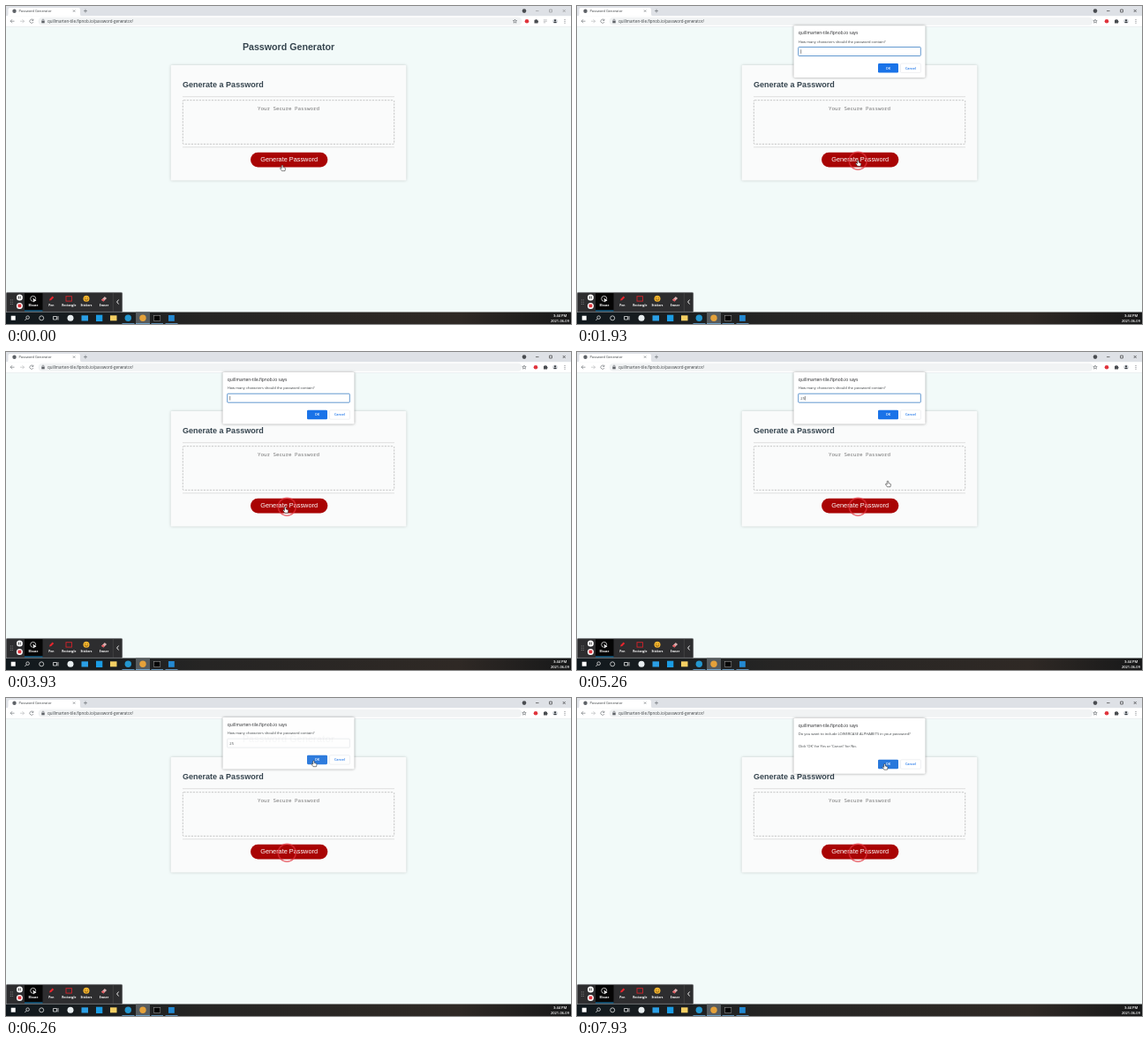
Recreate the animation shown at these times as an HTML page. Size 640 px wide and 360 px high, loop 8000 ms.

```html
<!DOCTYPE html>
<html lang="en">
<head>
<meta charset="utf-8">
<title>Password Generator</title>
<style>
html, body { margin: 0; width: 100%; height: 100%; overflow: hidden; background: #f2faf9; }
svg { display: block; font-family: "Open Sans", sans-serif; }
.page { font-family: "Liberation Sans", Arial, sans-serif; }
.mono { font: 5.85px "Noto Sans Mono", monospace; fill: #757575; }
.mid { text-anchor: middle; }
.line { fill: none; stroke: #5f6368; stroke-width: .6; }
.title { font-size: 4.9px; fill: #202124; }
.msg { font-size: 4.08px; fill: #3c4043; }
.btn { font-size: 3.8px; font-weight: 600; text-anchor: middle; }
.tool { font-size: 3.3px; font-weight: 700; fill: #fff; text-anchor: middle; }
.card { filter: drop-shadow(0 .7px 1.5px #0003); }
.dialog { filter: drop-shadow(0 .5px 1.5px #0006); }
</style>
</head>
<body>
<svg width="640" height="360" viewBox="0 0 640 360">
  <defs>
    <linearGradient id="bar">
      <stop offset="0" stop-color="#10181d"/>
      <stop offset=".35" stop-color="#262524"/>
      <stop offset=".8" stop-color="#2f2925"/>
      <stop offset="1" stop-color="#171819"/>
    </linearGradient>
    <g id="buttons">
      <rect id="ok" x="341" y="65.8" width="23" height="10.4" rx="1.3" fill="#1a73e8"/>
      <text class="btn" x="352.5" y="72.3" fill="#fff">OK</text>
      <rect x="366.5" y="65.8" width="23" height="10.4" rx="1.3" fill="#fff" stroke="#dadce0" stroke-width=".4"/>
      <text class="btn" x="378" y="72.3" fill="#1a73e8">Cancel</text>
    </g>
  </defs>

  <rect width="640" height="360" fill="#f2faf9"/>

  <g class="page">
    <text class="mid" x="320" y="50.3" font-size="10.67" font-weight="700" fill="#36454f">Password Generator</text>
    <rect class="card" x="186.7" y="67" width="266.6" height="130.6" rx="1" fill="#fafbfb"/>
    <text x="200" y="92.3" font-size="9.03" font-weight="700" fill="#36454f">Generate a Password</text>
    <path d="M200 102.7h240M200 159.8h240" stroke="#ccc" stroke-width=".6"/>
    <rect x="200.3" y="106.7" width="239.4" height="49.6" rx="1" fill="none" stroke="#b0b0b0" stroke-width=".7" stroke-dasharray="2.2 1.3"/>
    <text class="mono mid" x="320" y="118">Your Secure Password</text>
    <rect x="277" y="165.8" width="87.4" height="16.6" rx="8.3" fill="#a90404"/>
    <text class="mid" x="320.6" y="176.4" font-size="7.33" fill="#fff">Generate Password</text>
  </g>
  <circle id="ring" cx="318.3" cy="175.2" fill="none" stroke="#e2343e" stroke-width="1.5" opacity=".7"/>

  <!-- browser bar -->
  <rect width="640" height="11.5" fill="#dee1e6"/>
  <path d="M0 11.5q2.5 0 2.5-2.5V4q0-2 2-2H82q2 0 2 2v5q0 2.5 2.5 2.5z" fill="#fff"/>
  <rect y="11.3" width="640" height="12.2" fill="#fff"/>
  <rect x="36.5" y="12.7" width="548" height="9" rx="4.5" fill="#f1f3f4"/>
  <path d="M0 23.5h640" stroke="#dadce0" stroke-width=".4"/>
  <circle cx="9.5" cy="5.7" r="2.2" fill="#5f6368"/>
  <text x="14.5" y="7.2" font-size="3.9" fill="#3c4043">Password Generator</text>
  <path class="line" d="M76 4.5l2.2 2.2m0-2.2L76 6.7M88 5.6h4M90 3.6v4M9.5 17.2H5m2-2l-2 2 2 2M30.7 16a2.1 2.1 0 1 0 .2 2m0-3.3v1.7h-1.7M41 17v-1a1 1 0 0 1 2 0v1"/>
  <path class="line" d="M16 17.2h4.5m-2-2l2 2-2 2" opacity=".5"/>
  <rect x="40.3" y="16.8" width="3.4" height="2.5" fill="#5f6368"/>
  <text x="47" y="18.8" font-size="4.48" fill="#3c4043">quillmarten-tile.fipnob.io/password-generator/</text>
  <circle cx="587" cy="5.6" r="2.3" fill="#4a4d51"/>
  <path id="windowButtons" fill="none" stroke="#222" stroke-width=".6" d="M600 5.6h3.5M615.6 4h2.8v3h-2.8zM630.7 4l3 3m0-3l-3 3"/>
  <path id="star" class="line" d="M0-2.2l.6 1.5 1.6.1-1.2 1 .4 1.6L0 1.1-1.4 2l.4-1.6-1.2-1 1.6-.1z"/>
  <circle id="extension" cy="17.3" r="2.3" fill="#e0343c"/>
  <path id="puzzle" d="M-2-1.3h1.2a.8.8 0 0 1 1.6 0H2V0a.7.7 0 0 1 0 1.4v1h-4z" fill="#4a4d51"/>
  <path id="list" class="line" d="M608.8 15.8h4M608.8 17.3h4M608.8 18.8h2.4" opacity=".6"/>
  <circle cx="622" cy="17.2" r="2.7" fill="#cfd3d8"/>
  <circle cx="622" cy="16.3" r="1.1" fill="#33373b"/>
  <path d="M620 19q2-2.6 4 0z" fill="#33373b"/>
  <path d="M633 15v5" stroke="#5f6368" stroke-width=".9" stroke-dasharray=".9 1"/>

  <!-- dialogs -->
  <g id="prompt" class="dialog">
    <rect x="245.5" y="23" width="149" height="58.6" rx="1.3" fill="#fff"/>
    <text class="title" x="250.7" y="33.2">quillmarten-tile.fipnob.io says</text>
    <text class="msg" x="250.7" y="42.4">How many characters should the password contain?</text>
    <rect id="field" x="250.7" y="47.2" width="138.6" height="10" rx=".8" fill="#fff"/>
    <text id="typed" class="msg" x="253.3" y="53.7"></text>
    <path id="caret" d="M0 50v4.6" stroke="#222" stroke-width=".5"/>
    <use href="#buttons"/>
  </g>
  <g id="confirm" class="dialog">
    <rect x="245.5" y="23" width="149" height="62.7" rx="1.3" fill="#fff"/>
    <text class="title" x="250.7" y="33.2">quillmarten-tile.fipnob.io says</text>
    <text class="msg" x="250.7" y="42.4">Do you want to include LOWERCASE ALPHABETS in your password?</text>
    <text class="msg" x="250.7" y="55.6">Click 'OK' for Yes or 'Cancel' for No.</text>
    <use href="#buttons" y="4"/>
  </g>

  <!-- taskbar -->
  <rect y="346.5" width="640" height="13.5" fill="url(#bar)"/>
  <rect x="147" y="346.5" width="16" height="13.5" fill="#565b5e"/>
  <path d="M131.5 359.6h14M147 359.6h16M164.5 359.6h13.5M180.5 359.6h14" stroke="#76b9ed" stroke-width=".8"/>
  <rect x="5.7" y="350.7" width="5" height="5" fill="#fff"/>
  <g fill="none" stroke="#fff" stroke-width=".7">
    <circle cx="24.6" cy="352.6" r="1.8"/>
    <path d="M23.3 354l-2 2M53.5 351.5h4v3.5h-4zM59 351v4.5"/>
    <circle cx="40.2" cy="353.3" r="2.5"/>
  </g>
  <circle cx="73" cy="353.3" r="3.5" fill="#e8eef0"/>
  <rect x="85.5" y="350.3" width="7.5" height="6.2" fill="#2b9fe6"/>
  <rect x="102" y="349.7" width="7.3" height="7.3" fill="#1b9ce4"/>
  <rect x="118" y="350.3" width="7.5" height="6" fill="#f5cf63"/>
  <circle cx="138.3" cy="353.3" r="3.7" fill="#2497cf"/>
  <circle cx="155" cy="353.3" r="3.7" fill="#e5a13a"/>
  <rect x="167.3" y="350.3" width="7.5" height="6" fill="#050505" stroke="#aaa" stroke-width=".5"/>
  <rect x="184" y="350" width="6.8" height="6.8" fill="#2489d2"/>
  <g font-size="4.05" font-weight="600" fill="#fff" text-anchor="end">
    <text x="635.3" y="351.9">3:44 PM</text>
    <text x="638" y="357.6">2021-06-09</text>
  </g>

  <!-- recorder -->
  <rect x=".4" y="324.4" width="131.2" height="21.8" rx="1" fill="#2d2d2f" stroke="#5a5a5c" stroke-width=".7"/>
  <rect x="21" y="325" width="20.5" height="20.5" fill="#050505"/>
  <path d="M21 345h20.5" stroke="#1e9be0" stroke-width=".9"/>
  <path d="M5.3 332.5v6M7.3 332.5v6" stroke="#aaa" stroke-width=".8" stroke-dasharray=".8 1.5"/>
  <circle cx="15.4" cy="330" r="3.5" fill="#fff"/>
  <path d="M14.5 328.5v3M16.3 328.5v3" stroke="#222" stroke-width=".8"/>
  <circle cx="15.4" cy="339.4" r="3.5" fill="#fff"/>
  <rect x="13.5" y="337.5" width="3.8" height="3.8" rx=".8" fill="#e0343c"/>
  <circle cx="30.7" cy="331.3" r="3" fill="none" stroke="#ddd" stroke-width=".8"/>
  <path d="M30.5 330.5l4 3.3-1.9.2-1.1 1.6z" fill="#fff"/>
  <path d="M49 333.5l.7-2 3-3 1.5 1.5-3 3z" fill="#e8262e"/>
  <rect x="68" y="328.7" width="6.4" height="5.4" fill="none" stroke="#d8232b" stroke-width=".9"/>
  <circle cx="91" cy="331.3" r="3.5" fill="#f5b52e"/>
  <path d="M89 332q2 2.5 4 0M89.7 330.2v.8M92.3 330.2v.8" fill="none" stroke="#5b3a08" stroke-width=".7"/>
  <path d="M108 332.7l3.8-3.8 2.3 2-3.8 3.6z" fill="#d9b0b0"/>
  <path d="M108 332.7l1.5-1.5 2.3 2-1.5 1.3z" fill="#e2555c"/>
  <g class="tool">
    <text x="31" y="340.4">Mouse</text><text x="51.3" y="340.4">Pen</text>
    <text x="71.3" y="340.4">Rectangle</text><text x="91" y="340.4">Stickers</text>
    <text x="111" y="340.4">Eraser</text>
  </g>
  <path d="M121.3 325v21" stroke="#555" stroke-width=".5"/>
  <path d="M127.6 332.5l-2 2.5 2 2.5" fill="none" stroke="#fff" stroke-width=".9"/>

  <path id="hand" d="M-.8.4q.8-.9 1.6 0v2.1l1.9.6q.9.2.8 1.1l-.5 2.5H-.5l-2-2.7q-.1-1 .9-.7l.8.7z" fill="#fff" stroke="#222" stroke-width=".55"/>
</svg>
<script>
const LOOP = 8000, CLICK = 1530, PROMPT = 1800, CLOSE = 6200, CONFIRM = 7130, FADE = 330;
const $ = id => document.getElementById(id);
const clamp = v => Math.max(0, Math.min(1, v));
const set = (id, attrs) => {
  for (const key in attrs) $(id).setAttribute(key, attrs[key]);
};

// time, x, y of the fingertip
const path = [
  [0, 313, 180], [860, 318, 176], [1130, 318.3, 174.6], [3000, 318.3, 174.6],
  [3130, 316.3, 175.5], [5030, 316.3, 175.5], [5260, 352, 146],
  [5860, 348.5, 71], [7800, 348.5, 71], [7930, 348.5, 74.5], [LOOP, 348.5, 74.5]
];

function pointer(t) {
  const i = path.findIndex(p => p[0] > t);
  const [t0, x0, y0] = path[i - 1], [t1, x1, y1] = path[i];
  const k = (t - t0) / (t1 - t0), e = k * k * (3 - 2 * k);
  return `translate(${x0 + (x1 - x0) * e} ${y0 + (y1 - y0) * e})`;
}

// Dialogs drop in from above and rise again as they fade.
function dialog(id, t, start, end) {
  const enter = clamp((t - start + 20) / FADE), leave = clamp((t - end) / FADE);
  const lift = 8 * ((1 - enter) ** 4 + leave ** 1.2);
  set(id, {
    visibility: t >= start && leave < 1 ? "visible" : "hidden",
    opacity: Math.min(1, enter * 3) * (1 - leave ** 2),
    transform: `translate(0 ${-lift})`
  });
}

function draw(t) {
  const opened = t >= PROMPT, focused = t < CLOSE - 70;
  set("hand", { transform: pointer(t) });
  set("ring", {
    r: 10 * clamp((t - CLICK + 40) / 100),
    visibility: t < CLICK ? "hidden" : "visible"
  });
  set("windowButtons", { opacity: t < CLICK ? .45 : 1 });
  set("star", { transform: `translate(${opened ? 587 : 576.5} 17.2)` });
  set("extension", { cx: opened ? 600 : 590 });
  set("puzzle", { transform: `translate(${opened ? 611 : 600.5} 17)` });
  set("list", { visibility: opened ? "hidden" : "visible" });

  dialog("prompt", t, PROMPT, CLOSE);
  dialog("confirm", t, CONFIRM, LOOP);

  const text = "25".slice(0, (t >= 4600) + (t >= 4800));
  const blinkStart = t >= 4800 ? 4800 : t >= 4600 ? 4600 : PROMPT;
  const blinkOn = Math.floor((t - blinkStart) / 532) % 2 === 0;
  $("typed").textContent = text;
  set("field", { stroke: focused ? "#3b7fc4" : "#d5d8dc", "stroke-width": focused ? .8 : .5 });
  set("caret", { transform: `translate(${253.7 + text.length * 2.33} 0)`, opacity: +(focused && blinkOn) });
  set("ok", { fill: t >= 5860 ? "#2878dc" : "#1a73e8" });
}

const begin = performance.now();
(function tick() {
  draw((performance.now() - begin) % LOOP);
  requestAnimationFrame(tick);
})();
</script>
</body>
</html>
```
